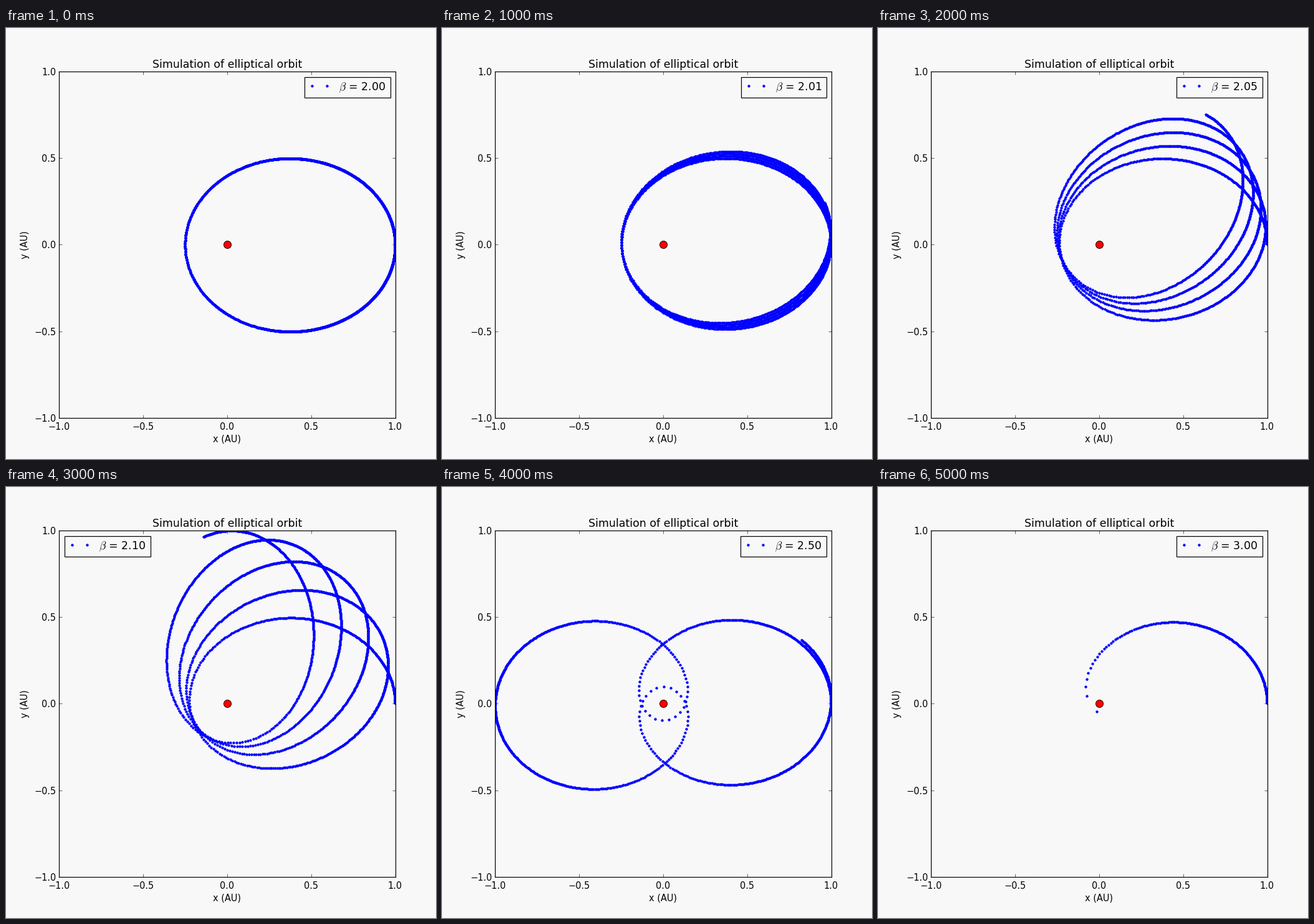
Write a matplotlib script that moves like this. It is 690 px wide and 693 px high and loops after 6000 ms.

```python
import math

import matplotlib.pyplot as plt
from matplotlib.animation import FuncAnimation
from matplotlib.patches import Rectangle

W, H = 690, 693
LEFT, RIGHT, TOP, BOTTOM = 85.1, 624.5, 70.0, 626.8
BG = "#f8f8f8"

GM = 4 * math.pi ** 2
V0 = math.sqrt(0.4 * GM)   # aphelion speed for e = 0.6
DT = 0.001

# exponent of the force law, swept angle in degrees, legend's left edge
RUNS = [
    (2.00, 1445.0, 478.5),
    (2.01, 1454.0, 479.5),
    (2.05, 1489.5, 478.5),
    (2.10, 1538.0, 93.6),
    (2.50, 1103.8, 478.5),
    (3.00, 240.0, 478.5),
]


def pt(px):
    """Pixels to points at 100 dpi."""
    return px * 0.72


def orbit(beta, sweep):
    """Euler-Cromer path around the sun until the angle is swept."""
    x, y, vx, vy = 1.0, 0.0, 0.0, V0
    xs, ys = [x], [y]
    angle, end = 0.0, math.radians(sweep)
    while angle < end and len(xs) < 4000:
        pull = GM / math.hypot(x, y) ** (beta + 1)
        vx -= pull * x * DT
        vy -= pull * y * DT
        nx, ny = x + vx * DT, y + vy * DT
        angle += math.atan2(x * ny - y * nx, x * nx + y * ny)
        x, y = nx, ny
        xs.append(x)
        ys.append(y)
    return xs, ys


plt.rcParams.update({
    "font.family": "DejaVu Sans",
    "mathtext.fontset": "cm",
    "axes.unicode_minus": True,
})

fig = plt.figure(figsize=(W / 100, H / 100), dpi=100, facecolor=BG)

ax = fig.add_axes([LEFT / W, 1 - BOTTOM / H,
                   (RIGHT - LEFT) / W, (BOTTOM - TOP) / H], facecolor=BG)
ax.set(xlim=(-1, 1), ylim=(-1, 1))
ticks = [-1, -0.5, 0, 0.5, 1]
ax.set_xticks(ticks)
ax.set_yticks(ticks)
ax.tick_params(direction="in", top=True, right=True, length=pt(4.8),
               width=pt(0.6), labelsize=pt(14.5))
ax.tick_params(axis="x", pad=pt(6.7))
ax.tick_params(axis="y", pad=pt(4.8))
for spine in ax.spines.values():
    spine.set_linewidth(pt(1.2))

# overlay in pixel units, y downwards
page = fig.add_axes([0, 0, 1, 1], zorder=5)
page.set(xlim=(0, W), ylim=(H, 0))
page.axis("off")

mid_x, mid_y = (LEFT + RIGHT) / 2, (TOP + BOTTOM) / 2
page.text(mid_x, 64, "Simulation of elliptical orbit", size=pt(17.4),
          ha="center", va="baseline")
page.text(mid_x, 665.5, "x (AU)", size=pt(14.5), ha="center", va="baseline")
page.text(35.2, mid_y, "y (AU)", size=pt(14.5), rotation=90,
          ha="right", va="center", rotation_mode="default").set_visible(False)
page.text(35.2, mid_y, "y (AU)", size=pt(14.5), rotation=90,
          rotation_mode="anchor", ha="center", va="baseline")

dot = dict(ls="none", marker=".", color="#0000ff", ms=pt(7.25), mew=pt(0.6))
path, = ax.plot([], [], zorder=2, **dot)
ax.plot([0], [0], "o", color="#ff0000", ms=pt(12.1), mec="black",
        mew=pt(0.9), zorder=3)

box = page.add_patch(Rectangle((0, 78.5), 138, 33, fc=BG, ec="black",
                               lw=pt(1.2)))
keys, = page.plot([], [], **dot)
label = page.text(0, 100, "", size=pt(17.4), ha="left", va="baseline")

paths = [orbit(beta, sweep) for beta, sweep, _ in RUNS]


def draw(i):
    beta, _, left = RUNS[i]
    right = 616.5 if left > mid_x else 231.5
    path.set_data(*paths[i])
    box.set_x(left)
    box.set_width(right - left)
    keys.set_data([left + 12.2, left + 36.6], [93, 93])
    label.set_x(left + 55.7)
    label.set_text(rf"$\beta$ = {beta:.2f}")
    return path, box, keys, label


anim = FuncAnimation(fig, draw, frames=len(RUNS), interval=1000,
                     init_func=lambda: draw(0), repeat=True, repeat_delay=0)
plt.show()
```
